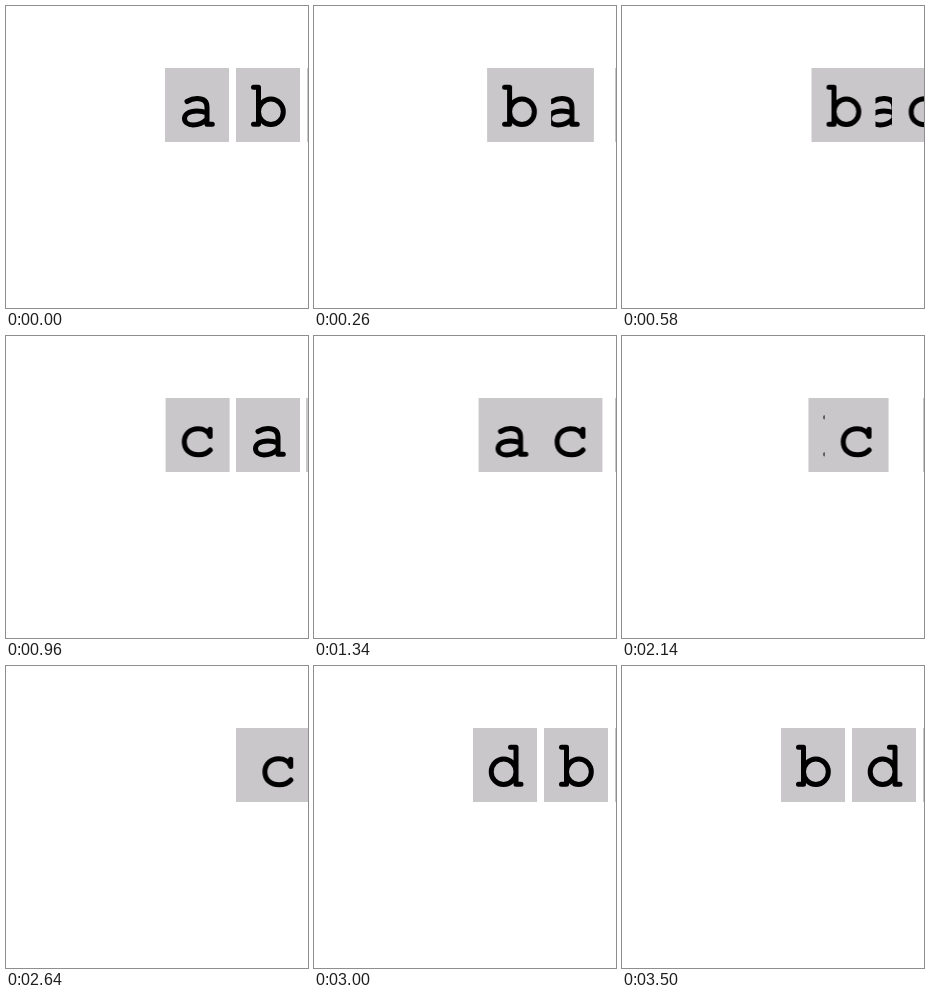
Write an HTML page that moves like this. It is 302 px wide and 302 px high and loops after 5.52 s.

```html
<!DOCTYPE html>
<html lang="en">
<head>
<meta charset="utf-8">
<title>Permutations by swapping</title>
<style>
  html, body { margin: 0; width: 100%; height: 100%; overflow: hidden; background: #fff; }
  svg { display: block; }
  rect { fill: #cac7ca; }
  path { fill: none; stroke: #000; stroke-width: 5; stroke-linecap: round; stroke-linejoin: round; }
</style>
</head>
<body>
<svg id="stage" width="302" height="302" viewBox="0 0 302 302"></svg>
<script>
const LOOP = 5520, SWAP = 500, FRAME = 1000 / 24, TICK = 20;
const SAMPLE = 41.57; // the swaps run slightly behind the frame rate
const LEFT = 159, TOP = 62, PITCH = 71;

// Slab letters as strokes, relative to their card
const letters = {
  a: 'M22 33.5Q27 30.5 32 30.5Q42 30.5 42 39V56.3H47.3M42 45Q37 43 32 43C23.5 43 19.5 46.5 19.5 50.5C19.5 54.2 23 57 28 57Q36 57 42 51',
  b: 'M17.5 19.2H22.5V56.2H17.5M22.5 43.8A12.4 12.8 0 1 1 47.3 43.8A12.4 12.8 0 1 1 22.5 43.8',
  c: 'M44.5 31.3V38.5C43 33.5 38 30.8 32.5 30.8C24 30.8 18.7 36.5 18.7 44C18.7 51.5 24 56.7 33 56.7C38 56.7 42 55 44.7 52',
  d: 'M37.5 19.2H43V56.2H48M43 43.8A12.4 12.8 0 1 1 18.2 43.8A12.4 12.8 0 1 1 43 43.8'
};

// Heap's algorithm: the first place trades with these places in turn
const partners = [1, 2, 1, 2, 1, 3, 1];
const orders = [Object.keys(letters)];
for (const place of partners) {
  const next = [...orders.at(-1)];
  [next[0], next[place]] = [next[place], next[0]];
  orders.push(next);
}

function svgNode(name, attributes, parent) {
  const node = document.createElementNS('http://www.w3.org/2000/svg', name);
  for (const key in attributes) node.setAttribute(key, attributes[key]);
  return parent.appendChild(node);
}

const stage = document.getElementById('stage');
const moves = Object.entries(letters).map(([letter, d]) => {
  const card = svgNode('g', { role: 'img', 'aria-label': letter }, stage);
  svgNode('rect', { width: 64, height: 74 }, card);
  svgNode('path', { d }, card);
  const steps = orders.map(order => ({
    transform: `translate(${LEFT + PITCH * order.indexOf(letter)}px, ${TOP}px)`,
    easing: 'ease'
  }));
  const move = card.animate(steps, { duration: SWAP * partners.length, fill: 'both' });
  move.pause();
  return move;
});

const lastFrame = SWAP * partners.length / FRAME;
const start = performance.now();

function draw() {
  const time = (performance.now() - start) % LOOP;
  const tick = Math.floor(time / TICK) * TICK;
  const frame = Math.min(lastFrame, Math.floor((tick + 4) / FRAME));
  for (const move of moves) move.currentTime = frame * SAMPLE;
  requestAnimationFrame(draw);
}
draw();
</script>
</body>
</html>
```
